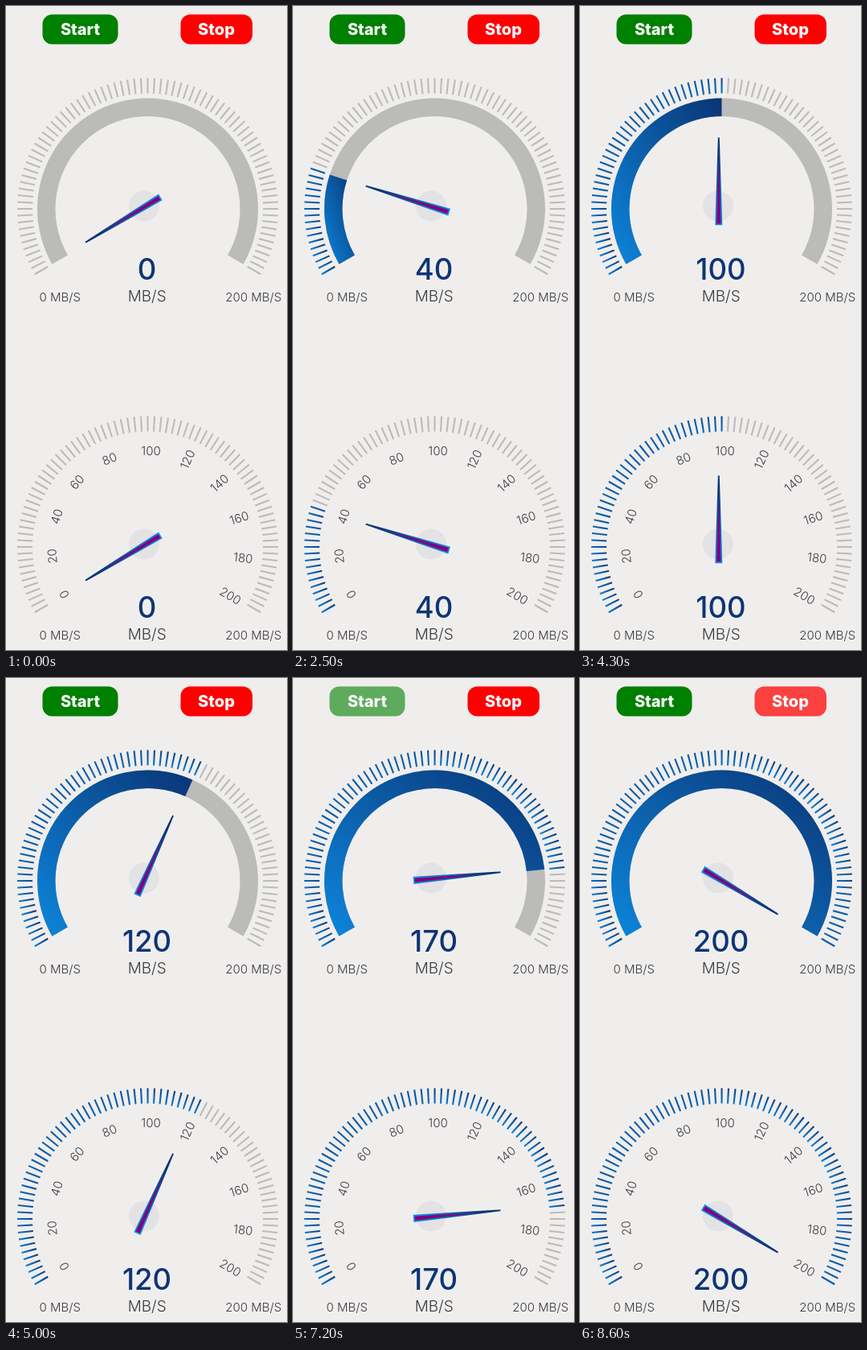
An HTML page that plays this animation: 350x800 px, repeating every 8.7 s.

```html
<!DOCTYPE html>
<html lang="en">
<head>
<meta charset="utf-8">
<title>Speed gauges</title>
<style>
html, body { margin: 0; width: 100%; height: 100%; overflow: hidden; background: #f0eeed; }
svg { display: block; width: 350px; height: 800px; font-family: Inter, "Open Sans", sans-serif; }
text { text-anchor: middle; fill: #3a3a3c; }
.button text { fill: #fff; font-size: 20px; font-weight: 800; }
.value { font-size: 36.5px; font-weight: 500; fill: #0d3575; }
.unit { font-size: 19px; font-weight: 300; }
.small { font-size: 15px; font-weight: 300; }
</style>
</head>
<body>
<svg viewBox="0 0 350 800">
  <defs>
    <linearGradient id="blue" x1="0" y1="1" x2="1" y2="0">
      <stop offset="0" stop-color="#0d86dc"/><stop offset="1" stop-color="#0a3474"/>
    </linearGradient>
    <linearGradient id="edge" gradientUnits="userSpaceOnUse" x1="-23" y1="0" x2="70" y2="0">
      <stop offset="0" stop-color="#0d90e4"/><stop offset="1" stop-color="#0a3474"/>
    </linearGradient>
  </defs>
  <g id="start" class="button">
    <rect x="45.5" y="10.5" width="94" height="37" rx="12" fill="#008000"/>
    <text x="92.5" y="36">Start</text>
  </g>
  <g id="stop" class="button">
    <rect x="217.5" y="10.5" width="89.5" height="37" rx="12" fill="#f00"/>
    <text x="262" y="36">Stop</text>
  </g>
  <g id="gauges"></g>
</svg>
<script>
const LOOP = 8700, MAX = 200, TICKS = 80, CX = 176.5, CY = 252, GREY = '#bbbbb9';
const $ = s => document.querySelector(s);
const dialAngle = f => 210 - 240 * f;

function polar(r, deg) {
  const a = deg * Math.PI / 180;
  return [CX + r * Math.cos(a), CY - r * Math.sin(a)].map(n => n.toFixed(2)).join(' ');
}

function ring(f) {
  if (!f) return '';
  const a = dialAngle(f), large = f > .75 ? 1 : 0;
  return `M${polar(137.5, 210)}A137.5 137.5 0 ${large} 1 ${polar(137.5, a)}` +
    `L${polar(115, a)}A115 115 0 ${large} 0 ${polar(115, 210)}Z`;
}

function tick(i) {
  const a = dialAngle(i / TICKS), outer = .37, inner = .42;
  const corners = [[143.5, a - inner], [162.5, a - outer], [162.5, a + outer], [143.5, a + inner]];
  return `<path class="tick" d="M${corners.map(c => polar(...c)).join('L')}Z"/>`;
}

// Labels follow the rim up to the top, then point outward.
function label(k) {
  const a = 210 - 24 * k - .5, turn = k < 6 ? 90 - a : -a;
  const nudge = k === 5 ? 3 : 0;
  return `<text class="small" transform="translate(${polar(119.5, a)}) rotate(${turn})" x="${nudge}" y="5.4">${k * 20}</text>`;
}

function gauge(y, face) {
  return `<g transform="translate(0 ${y})">
    ${Array.from({ length: TICKS + 1 }, (_, i) => tick(i)).join('')}${face}
    <circle cx="172" cy="248.5" r="19" fill="#e3e2e5"/>
    <path class="needle" d="M-22 -3.6L86 0L-22 3.6Z" fill="#800080" stroke="url(#edge)" stroke-width="1.8"/>
    <text class="value" x="175.5" y="340"></text>
    <text class="unit" x="175.7" y="367.3">MB/S</text>
    <text class="small" x="67.3" y="366.5">0 MB/S</text>
    <text class="small" x="308.3" y="366.5">200 MB/S</text>
  </g>`;
}

$('#gauges').innerHTML =
  gauge(0, `<path d="${ring(1)}" fill="${GREY}"/><path id="progress" fill="url(#blue)"/>`) +
  gauge(420, Array.from({ length: 11 }, (_, k) => label(k)).join(''));

const ticks = document.querySelectorAll('.tick');
const needles = document.querySelectorAll('.needle');
const values = document.querySelectorAll('.value');

// The picture advances every 100 ms and skips one step about every 680 ms.
function stepTime(t) {
  const s = Math.floor(t / 100);
  const k = Math.round((s * 100 - 1020) / 680);
  return 100 * (k >= 0 && Math.round((1020 + 680 * k) / 100) === s ? s - 1 : s);
}

// Ten units per 288 ms while running.
function speed(t) {
  const count = (from, max) => Math.max(0, Math.min(max, Math.floor((t - from) / 288)));
  return 10 * (count(1295, 17) + count(7252, 3));
}

const ease = p => p < .5 ? 2 * p * p : 1 - 2 * (1 - p) ** 2;

function pressed(t, at) {
  const d = t - at;
  if (d < 0 || d > 400) return 1;
  return d < 150 ? 1 - .8 * ease(d / 150) : .2 + .8 * ease((d - 150) / 250);
}

let shown = -1;
function show(v) {
  if (v === shown) return;
  shown = v;
  const f = v / MAX;
  $('#progress').setAttribute('d', ring(f));
  ticks.forEach((el, i) => {
    const lit = v > 0 && i % (TICKS + 1) <= f * TICKS + 1e-6;
    el.setAttribute('fill', lit ? 'url(#blue)' : GREY);
  });
  needles.forEach(el => el.setAttribute('transform', `translate(172.8 249.3) rotate(${242 * f - 211})`));
  values.forEach(el => el.textContent = v);
}

const begin = performance.now();
function draw() {
  const t = stepTime((performance.now() - begin) % LOOP);
  show(speed(t));
  $('#start').setAttribute('opacity', Math.min(pressed(t, 650), pressed(t, 7125)));
  $('#stop').setAttribute('opacity', Math.min(pressed(t, 6560), pressed(t, 8538)));
  requestAnimationFrame(draw);
}
draw();
</script>
</body>
</html>
```
